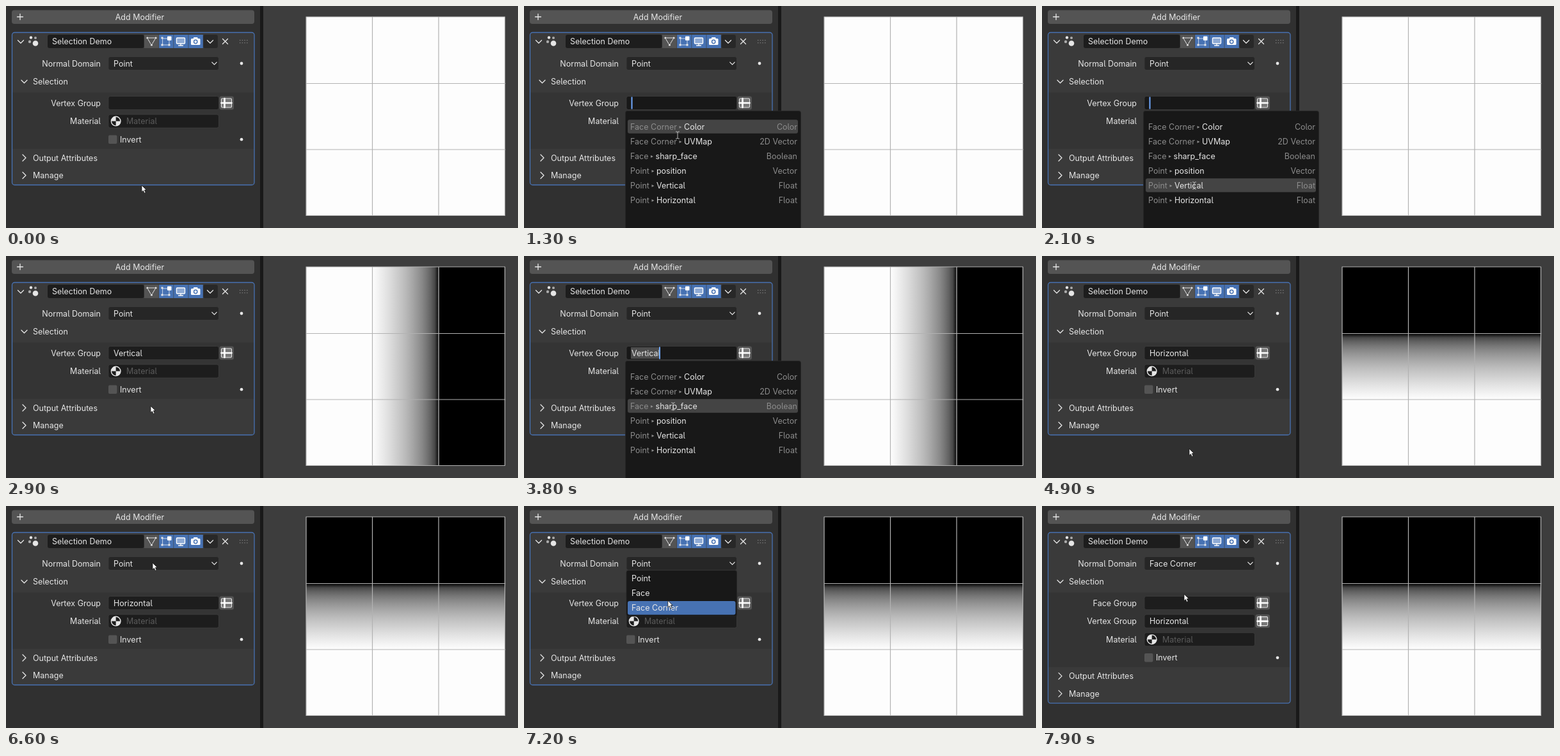
An HTML page for the animation above (8000 ms loop, 800 by 348 pixels).

```html
<!DOCTYPE html>
<html lang="en">
<head>
<meta charset="utf-8">
<title>Selection Demo</title>
<style>
  html, body { margin: 0; width: 100%; height: 100%; overflow: hidden; background: #303030; }
  svg { display: block; }
  text { font: 12.5px Inter, "Noto Sans", sans-serif; font-feature-settings: "cv05"; fill: #e6e6e6; white-space: pre; }
  .dim { fill: #8c8c8c; }
  .faint { fill: #5c5c5c; }
  .sep { font: 8px "DejaVu Sans", sans-serif; }
</style>
</head>
<body>
<svg id="stage" width="800" height="348" viewBox="0 0 800 348"></svg>
<script>
const LOOP = 8000, STEP = 100, ROW = 28.6;
const FIELD = '#1d1d1d', GREY = '#545454', BLUE = '#4772b3', MENU = '#181818', INK = '#e6e6e6';

// Pointer path: time, x, y
const path = [
  [0, 212, 282], [100, 212, 282], [700, 234, 152], [1000, 237, 156], [1300, 240, 202],
  [1800, 238, 281], [2300, 238, 281], [2900, 226, 236], [3400, 229, 150], [3800, 233, 235],
  [4300, 231, 304], [4800, 231, 304], [4900, 230, 303], [5800, 230, 303], [6600, 229, 90],
  [6900, 229, 91], [7300, 224, 160], [7600, 224, 160], [7900, 222, 139], [LOOP, 222, 139]
];

const items = [
  ['Face Corner', 'Color', 'Color'], ['Face Corner', 'UVMap', '2D Vector'],
  ['Face', 'sharp_face', 'Boolean'], ['Point', 'position', 'Vector'],
  ['Point', 'Vertical', 'Float'], ['Point', 'Horizontal', 'Float']
];

const rect = (x, y, w, h, fill, r = 0, extra = '') =>
  `<rect x="${x}" y="${y}" width="${w}" height="${h}" rx="${r}" fill="${fill}" ${extra}/>`;
const dot = (x, y, r, fill = INK) => `<circle cx="${x}" cy="${y}" r="${r}" fill="${fill}"/>`;
const line = (d, color = INK, w = 1.3) =>
  `<path d="${d}" fill="none" stroke="${color}" stroke-width="${w}" stroke-linecap="round" stroke-linejoin="round"/>`;
const text = (x, y, s, anchor = 'start', cls = '') =>
  `<text x="${x}" y="${y + 4.5}" text-anchor="${anchor}" class="${cls}">${s}</text>`;
const label = (y, s) => text(148, y, s, 'end');
const down = (x, y, s = 4.5) => line(`M${x - s} ${y - s / 2}l${s} ${s}l${s} ${-s}`);
const right = (x, y) => line(`M${x - 2.5} ${y - 5}l5 5l-5 5`);
const field = (y, fill = FIELD) => rect(160, y - 10.5, 172.5, 21, fill, 3, 'stroke="#414141" stroke-width=".7"');

function pointer(t) {
  const i = path.findIndex(p => p[0] > t);
  const [t0, x0, y0] = path[i - 1], [t1, x1, y1] = path[i];
  const k = (t - t0) / (t1 - t0), e = k * k * (3 - 2 * k);
  return [x0 + (x1 - x0) * e, y0 + (y1 - y0) * e];
}

function headerIcons() {
  let s = dot(39, 49.5, 2.2) + dot(46, 50, 2, '#aaa') + dot(37, 56, 2.2, '#aaa') + dot(46, 58.5, 4.3);
  s += rect(65, 45, 150.5, 21, FIELD, 3) + text(72, 55.5, 'Selection Demo');
  [GREY, BLUE, BLUE, BLUE, '#282828'].forEach((c, i) => s += rect(216 + i * 23.1, 45, 22.5, 21, c, i == 4 ? 3 : 0));
  s += line('M221 50H234L227.5 61Z', INK, 1);
  [[221, 50], [234, 50], [227.5, 61]].forEach(([x, y]) => s += dot(x, y, 2, GREY) + dot(x, y, 1.6));
  s += line('M245 51H255V61H245Z', '#c9d6eb', 1);
  [[244, 50], [244, 61], [255, 61]].forEach(([x, y]) => s += rect(x - 1.5, y - 1.5, 3, 3, INK));
  s += rect(252, 47.5, 6.5, 6.5, '#fff', 1);
  s += rect(266.5, 50, 13, 9, '#8fabd5', 1, 'stroke="#fff" stroke-width="1.4"') + line('M273 59v2.5M269.5 62h7', '#fff');
  s += rect(289, 51, 14.5, 10, '#fff', 1.5) + rect(293, 49, 6.5, 3, '#fff', 1) + dot(296.2, 56, 3.4, BLUE) + dot(296.2, 56, 1.9, '#fff');
  s += down(319, 56) + line('M338.5 51.5l8 8m0-8l-8 8');
  for (let i = 0; i < 8; i++) s += rect(365 + i % 4 * 3.7, i < 4 ? 53 : 57, 1.4, 1.4, '#777');
  return s;
}

function tableButton(y) {
  return rect(333.5, y - 10.5, 22.5, 21, GREY, 3) +
    rect(336.5, y - 7, 16, 14, '#777', 1.5, 'stroke="#e6e6e6" stroke-width="1.1"') +
    line(`M341.5 ${y - 7}V${y + 7}M336.5 ${y}H352.5`, '#fff', 2.6);
}

function groupRow(y, name, value, editing) {
  let s = label(y, name) + field(y, editing ? MENU : FIELD);
  const caret = value ? 212 : 168.5;
  if (editing && value) s += rect(167, y - 9, 45, 18, '#4d4d4d');
  s += text(168, y, value);
  if (editing) s += rect(caret - 1, y - 9.5, 2, 19, '#71a8ff');
  return s + tableButton(y);
}

function panel(domain, group, editing) {
  const corner = domain == 'Face Corner', shift = corner ? ROW : 0;
  let s = rect(9, 6.5, 379, 21.5, GREY, 4) + line('M17.5 17h9M22 12.5v9') + text(209, 17, 'Add Modifier', 'middle');
  s += rect(9.5, 41.5, 378.5, 239 + shift, '#3a3a3a', 4);
  s += rect(10, 135.5, 377.5, 88.5 + shift, '#343434');
  s += rect(9.5, 41.5, 378.5, 239 + shift, 'none', 4, `stroke="${BLUE}" stroke-width="1.3"`);
  s += down(23, 56) + headerIcons();
  s += label(90, 'Normal Domain') + field(90, '#262626') + text(168, 90, domain) + down(325.5, 90, 3.7) + dot(368, 90, 2.4);
  s += down(28.5, 118.5) + text(42, 118.5, 'Selection');
  if (corner) s += groupRow(152, 'Face Group', '');
  s += groupRow(152 + shift, 'Vertex Group', group, editing);
  const m = 180.6 + shift, v = 209.2 + shift;
  s += label(m, 'Material') + field(m) + text(188, m, 'Material', 'start', 'faint');
  s += dot(171.7, m, 8) + `<path d="M171.7 ${m}v-6.6a6.6 6.6 0 0 1 6.6 6.6zv6.6a6.6 6.6 0 0 1-6.6-6.6z" fill="${FIELD}"/>`;
  s += rect(160, v - 6.7, 13.5, 13.5, GREY, 2) + text(178, v, 'Invert') + dot(368, v, 2.4);
  s += right(28.5, 238 + shift) + text(42, 238 + shift, 'Output Attributes');
  return s + right(28.5, 265.5 + shift) + text(42, 265.5 + shift, 'Manage');
}

// Linear weight shown through a display gamma
const ramp = Array.from({ length: 17 }, (_, i) => {
  const c = Math.round(253 * (1 - i / 16) ** (1 / 2.2));
  return `<stop offset="${i / 16}" stop-color="rgb(${c},${c},${c})"/>`;
}).join('');
const defs = `<defs><linearGradient id="across">${ramp}</linearGradient>
  <linearGradient id="up" x1="0" x2="0" y1="1" y2="0">${ramp}</linearGradient></defs>`;

function viewport(group) {
  let s = rect(397, 0, 5, 348, '#191919') + rect(402, 0, 398, 348, '#3d3d3d') + rect(469, 17, 311, 311, '#fdfdfd');
  if (group == 'Vertical') s += rect(572.5, 17, 104, 311, 'url(#across)') + rect(676.5, 17, 103.5, 311, '#000');
  if (group == 'Horizontal') s += rect(469, 121.5, 311, 103, 'url(#up)') + rect(469, 17, 311, 104.5, '#000');
  return s + line('M469 17H779.5V328.5H469ZM572.5 17V328M676 17V328M469 121.5H780M469 225H780', '#b2b2b2', 1.2);
}

function searchMenu(active) {
  let s = rect(158.5, 164.5, 274, 190, MENU, 3, 'stroke="#282828" stroke-width=".8"');
  items.forEach(([domain, name, type], i) => {
    const y = 189 + i * 23;
    if (i == active) s += rect(162, y - 10.7, 266, 21.4, '#444', 3);
    s += text(166, y, `<tspan class="dim">${domain} </tspan><tspan class="dim sep" dy="-1.5">▸</tspan><tspan dy="1.5"> ${name}</tspan>`);
    s += text(427, y, type, 'end', 'dim');
  });
  return s;
}

function domainMenu(y) {
  let s = rect(160, 101, 172.5, 72, MENU, 3, 'stroke="#282828" stroke-width=".8"');
  const active = Math.floor((y - 102) / 23);
  ['Point', 'Face', 'Face Corner'].forEach((name, i) => {
    if (i == active) s += rect(162, 103 + i * 23, 168.5, 21.5, BLUE, 3);
    s += text(168, 113.5 + i * 23, name);
  });
  return s;
}

function cursor(x, y, beam) {
  if (beam) return line(`M${x - 2.5} ${y - 5}h1.5l1 1l1-1h1.5M${x} ${y - 4}v9M${x - 2.5} ${y + 6}h1.5l1-1l1 1h1.5`, '#b8b8b8', 1);
  return `<path d="M${x} ${y - 1}v10.5l2.4-2.1l1.8 4l2-.9l-1.8-3.9h3.1z" fill="#fff" stroke="#111" stroke-width=".8"/>`;
}

function scene(t) {
  const [x, y] = pointer(t);
  const editing = t >= 800 && t < 2200 || t >= 3400 && t < 4900;
  const group = t < 2200 ? '' : t < 4900 ? 'Vertical' : 'Horizontal';
  const domain = t < 7500 ? 'Point' : 'Face Corner';
  const hover = Math.floor((y - 180.5) / 23);
  let s = defs + rect(0, 0, 800, 348, '#303030') + panel(domain, group, editing) + viewport(group);
  if (editing) s += searchMenu(hover < 0 && group ? 4 : hover);
  if (t >= 6900 && t < 7500) s += domainMenu(y);
  return s + cursor(x, y, editing);
}

const stage = document.getElementById('stage');
let shown = -1;
function draw() {
  const t = Math.floor(performance.now() % LOOP / STEP) * STEP;
  if (t != shown) stage.innerHTML = scene(shown = t);
  requestAnimationFrame(draw);
}
draw();
</script>
</body>
</html>
```
